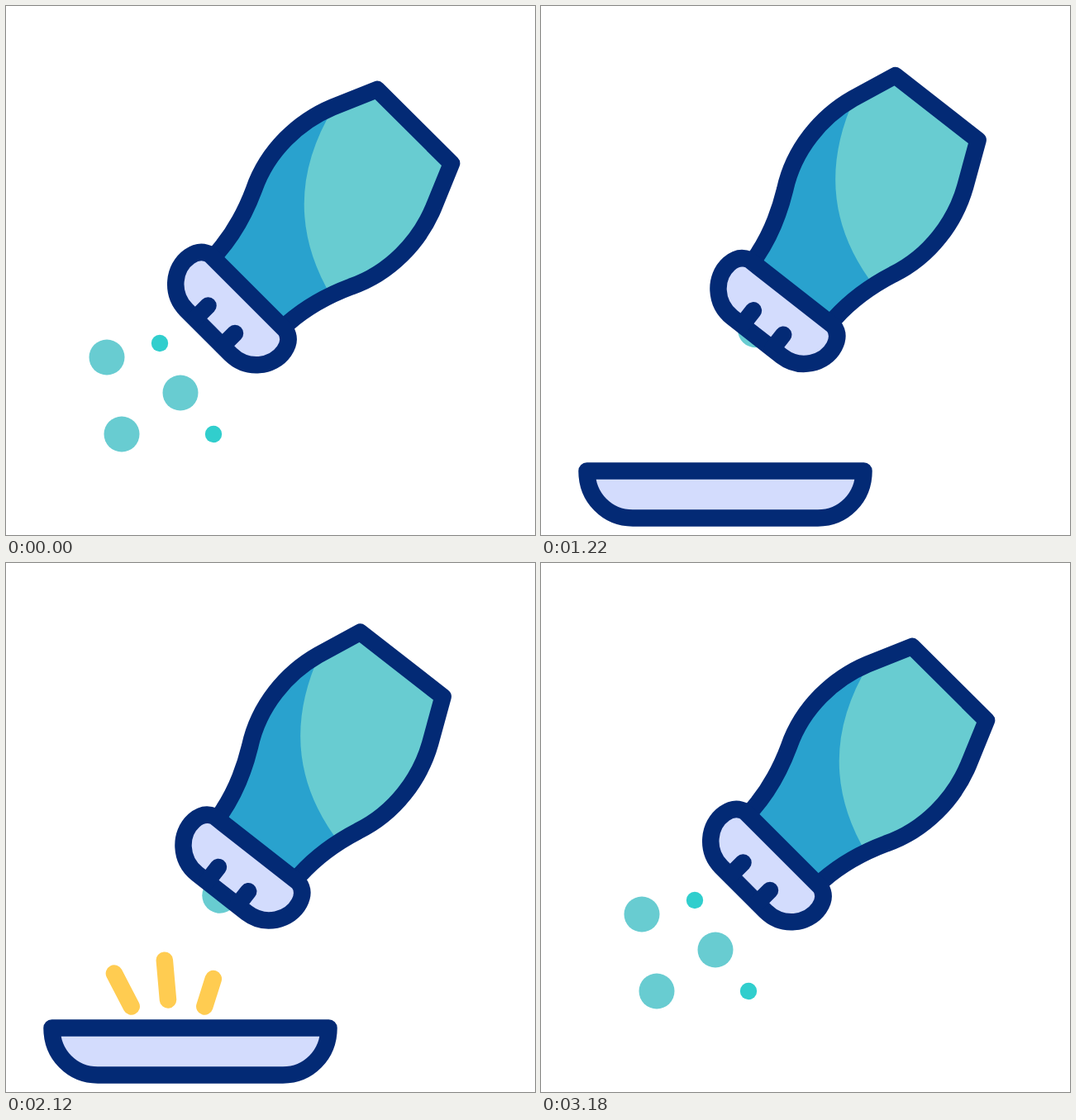
Animation of 640x640 px, one loop 3.54 s. Source, as an HTML page:

```html
<!DOCTYPE html>
<html lang="en">
<head>
<meta charset="utf-8">
<title>Salt shaker</title>
<style>
html, body { margin: 0; width: 100%; height: 100%; overflow: hidden; background: #fff; }
svg { display: block; width: 100vw; height: 100vh; }
.ink, line { stroke: #032a75; stroke-width: 20.5; stroke-linecap: round; stroke-linejoin: round; }
line { stroke: #ffcc51; }
</style>
</head>
<body>
<svg viewBox="0 0 640 640">
  <defs>
    <!-- Open at the neck, where the cap covers it -->
    <path id="body" d="M341.500 383.500C364.500 363.500 389.500 350 417.500 339.500C465 323 500 285 517 244.500L539 190.500L449 101L395 122.500C354.500 139.500 316.500 174.500 300 222C289.500 250 276 275 256 298"/>
    <clipPath id="inside"><use href="#body"/></clipPath>
  </defs>
  <g id="loose"></g>
  <path id="bowl" class="ink" fill="#d3dcfd" d="M55.500 562.500H390.500C390.500 595 366 619.500 335 619.500H111C80 619.500 55.500 595 55.500 562.500Z"/>
  <g id="shaker">
    <use href="#body" fill="#29a2ce"/>
    <path clip-path="url(#inside)" fill="#68ccd1" d="M397 122Q326 238 394 352L560 352V80H397Z"/>
    <use href="#body" class="ink" fill="none"/>
    <path class="ink" fill="#d3dcfd" d="M247 301Q235 294 222 303C202 317 199 348 218 367.500L272 421.500C291.500 440.500 322.500 437.500 336.500 417.500Q345.500 404.500 338.500 392.500Z"/>
    <path class="ink" fill="none" d="M229.500 377.500L244.500 362.500M262 411L277 396"/>
  </g>
</svg>
<script>
const LOOP = 3540, STEP = 20, BOWL_Y = 583;
const $ = id => document.getElementById(id);
const mix = (a, b, k) => a + (b - a) * k;

function add(tag) {
  return $('loose').appendChild(document.createElementNS('http://www.w3.org/2000/svg', tag));
}

function set(el, attrs) {
  for (const name in attrs) el.setAttribute(name, attrs[name]);
}

const show = (el, on) => set(el, { visibility: on ? 'visible' : 'hidden' });

// Eased progress from 0 to 1 between two times
function ease(t, from, to) {
  const k = Math.min(1, Math.max(0, (t - from) / (to - from)));
  return k * k * (3 - 2 * k);
}

// A grain leaves the cap, comes to rest in the air, then drops into the bowl
function grain(helping, big, from, rest) {
  const el = add('circle');
  set(el, { r: big ? 21.5 : 10.2, fill: big ? '#68ccd1' : '#31cecd' });
  return t => {
    const age = (t - helping.out + LOOP) % LOOP;
    const out = ease(age, 0, helping.settle);
    const drop = ease(age, helping.drop, helping.land);
    set(el, { cx: mix(from[0], rest[0], out), cy: mix(mix(from[1], rest[1], out), BOWL_Y, drop) });
    show(el, age < helping.land);
  };
}

// A stroke draws itself from its start, then erases the same way
function streak(x, y, dx, dy, grow, full, fade, gone) {
  const el = add('line');
  return t => {
    const head = ease(t, grow, full), tail = ease(t, fade, gone);
    set(el, { x1: x + dx * tail, y1: y + dy * tail, x2: x + dx * head, y2: y + dy * head });
    show(el, head > tail);
  };
}

// One spark of the fan over the bowl, side = -1, 0 or 1
function spark(side) {
  const angle = (-5 + 22.5 * side) * Math.PI / 180;
  const length = 48 - 5 * side - 8 * Math.abs(side);
  return streak(196 + 44.3 * side, 528.5 + 8 * Math.abs(side),
    length * Math.sin(angle), -length * Math.cos(angle), 1900, 2080, 2140, 2300);
}

const shower = { out: 2100, settle: 806, drop: 1890, land: 2430 };
const pinch = { out: 1200, settle: 380, drop: 380, land: 780 };

const parts = [
  grain(shower, true, [233, 352], [122, 425]),
  grain(shower, true, [308, 373], [211, 468]),
  grain(shower, true, [259, 402], [140, 518]),
  grain(shower, false, [254, 355], [186, 408]),
  grain(shower, false, [304, 421], [251, 518]),
  grain(pinch, true, [260, 391], [203, 480]),
  grain(pinch, false, [255, 345], [211, 402]),
  grain(pinch, false, [275, 365], [251, 418]),
  ...[-1, 0, 1].map(spark),
  streak(139, 588, 173, -1.7, 2440, 2660, 2800, 3080)
];

// Heights of the shaker at the turns of its swing
const swing = [[220, 0], [670, -54], [1150, -5], [1620, -67.5], [2100, -9], [2575, -53], [2940, 0]];

function lift(t) {
  return swing.reduce((y, [time, next], i) => i ? mix(y, next, ease(t, swing[i - 1][0], time)) : next, 0);
}

function draw(t) {
  const arrive = ease(t, 220, 640);
  const tilt = -6.9 * (arrive - ease(t, 2530, 2940));
  set($('shaker'), { transform: `translate(0 ${lift(t)}) rotate(${tilt} 372 267)` });

  const slide = 402 * (arrive - 1) + 600 * ease(t, 2250, 2816);
  set($('bowl'), { transform: `translate(${slide} 0)` });
  show($('bowl'), slide < 600);

  for (const part of parts) part(t);
}

let origin;
function tick(now) {
  origin ??= now;
  draw(Math.floor(((now - origin) % LOOP) / STEP) * STEP);
  requestAnimationFrame(tick);
}
draw(0);
requestAnimationFrame(tick);
</script>
</body>
</html>
```
